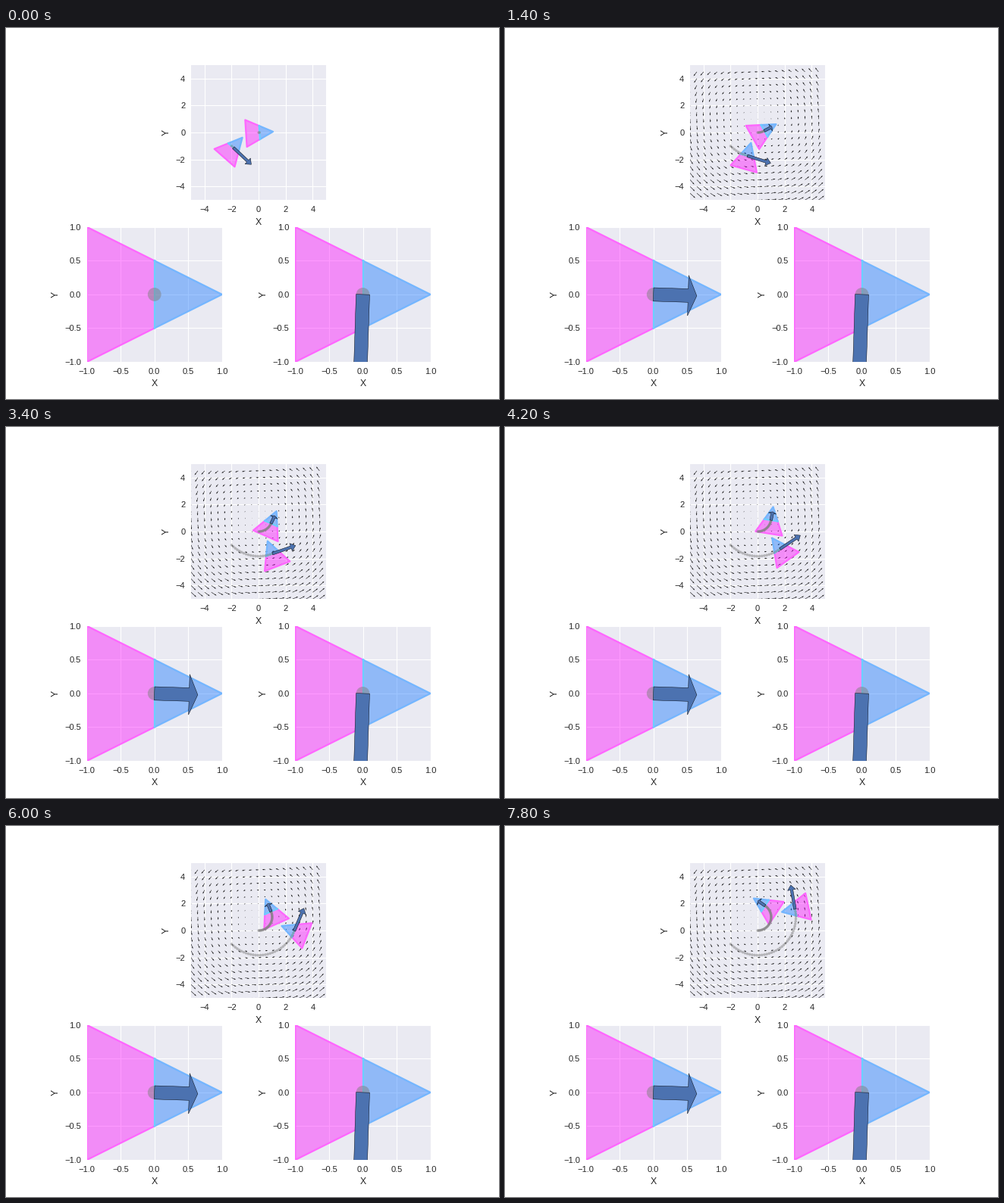
A matplotlib script that plays this animation: 650 px wide and 490 px high, repeating every 8 s.

```python
import numpy as np
import matplotlib.pyplot as plt
from matplotlib.animation import FuncAnimation
from matplotlib.patches import Circle, Polygon

plt.rcParams.update({
    "font.family": "Liberation Sans",
    "axes.facecolor": "#EAEAF2", "axes.linewidth": 0, "axes.axisbelow": True,
    "axes.grid": True, "grid.color": "white", "grid.linewidth": 1,
    "grid.linestyle": "-", "axes.labelsize": 11, "axes.labelpad": 5,
    "axes.labelcolor": "0.15", "text.color": "0.15",
    "xtick.color": "0.15", "ytick.color": "0.15",
    "xtick.labelsize": 10, "ytick.labelsize": 10,
    "xtick.major.size": 0, "ytick.major.size": 0,
    "xtick.major.pad": 7, "ytick.major.pad": 7,
})

FRAMES, INTERVAL = 40, 200
TURN = 2 * np.pi / 98            # rotation per step
RATE = TURN / 0.1                # angular speed
PIVOT = np.array([0.0, 1.0])

REAR = np.array([(0, 0.5), (-1, 1), (-1, -1), (0, -0.5)])
NOSE = np.array([(0, 0.5), (1, 0), (0, -0.5)])
SEAM = np.array([(0, 0.5), (0, -0.5)])


def rot(a):
    return np.array([[np.cos(a), -np.sin(a)], [np.sin(a), np.cos(a)]])


def arrow_points(tail, vec):
    """Outline of a block arrow of fixed width from tail along vec."""
    size = np.hypot(*vec)
    x = np.array([0, 0, 0.8, 0.8, 1, 0.8, 0.8]) * size
    y = np.array([0.1, -0.1, -0.1, -0.3, 0, 0.3, 0.1])
    return np.column_stack([x, y]) @ rot(np.arctan2(vec[1], vec[0])).T + tail


class Body:
    """Two-coloured triangle with an optional velocity arrow."""

    def __init__(self, ax):
        self.fills = [ax.add_patch(Polygon(p, fc=c, alpha=0.4, lw=0, zorder=2))
                      for p, c in ((REAR, "#ff00ff"), (NOSE, "#0a70ff"))]
        self.lines = [ax.plot([], [], color=c, lw=2, zorder=3)[0]
                      for c in ("#ff66ff", "#74b6ff", "#6ccfff")]
        self.arrow = ax.add_patch(Polygon(arrow_points((0, 0), (1, 0)),
                                          fc="#4C72B0", ec="black", lw=0.4,
                                          zorder=5))
        self.place(np.zeros(2), 0)

    def place(self, pos, angle):
        m = rot(angle).T
        for patch, pts in zip(self.fills, (REAR, NOSE)):
            patch.set_xy(pts @ m + pos)
        for line, pts in zip(self.lines, (REAR, NOSE, SEAM)):
            line.set_data(*(pts @ m + pos).T)

    def point(self, pos, vec):
        self.arrow.set_xy(arrow_points(pos, vec))


class Robot:
    """Rigid rider on a circle about PIVOT, with its own body-frame panel."""

    def __init__(self, world, panel, start, heading):
        self.offset = np.array(start) - PIVOT
        self.heading = heading
        self.body = Body(world)
        self.local = Body(panel)
        dot(panel, (0, 0))
        self.trail = [dot(world, self.pose(k)[0]) for k in range(FRAMES + 1)]
        # backward difference, so it lags by half a step
        tangent = RATE * rot(np.pi / 2 - TURN / 2) @ self.offset
        self.vel = rot(-heading) @ tangent
        self.local.point(np.zeros(2), self.vel)

    def pose(self, step):
        a = step * TURN
        return PIVOT + rot(a) @ self.offset, a + self.heading

    def update(self, step):
        pos, angle = self.pose(step)
        self.body.place(pos, angle)
        self.body.point(pos, rot(angle) @ self.vel)
        for k, mark in enumerate(self.trail):
            mark.set_visible(k <= step)

    def show_arrows(self, on):
        self.body.arrow.set_visible(on)
        self.local.arrow.set_visible(on)


def dot(ax, pos):
    return ax.add_patch(Circle(pos, 0.1, fc="0.5", alpha=0.5, lw=0, zorder=4))


def make_axes(cell, span, lim, ticks):
    ax = plt.subplot2grid((2, 2), cell, colspan=span)
    ax.set_aspect("equal")
    ax.set(xlim=(-lim, lim), ylim=(-lim, lim), xticks=ticks, yticks=ticks,
           xlabel="X", ylabel="Y")
    return ax


fig = plt.figure(figsize=(8.125, 6.125), dpi=80, facecolor="white")
fig.subplots_adjust(left=0.125, right=0.9, bottom=0.1, top=0.9,
                    wspace=0.2, hspace=0.2)
world = make_axes((0, 0), 2, 5, np.arange(-4, 5, 2))
left = make_axes((1, 0), 1, 1, np.linspace(-1, 1, 5))
right = make_axes((1, 1), 1, 1, np.linspace(-1, 1, 5))

gx, gy = np.meshgrid(np.arange(-5, 5, 0.5), np.arange(-5, 5, 0.5))
field = world.quiver(gx, gy, -RATE * (gy - PIVOT[1]), RATE * (gx - PIVOT[0]),
                     color="black", zorder=1.5)

lead = Robot(world, left, (0, 0), 0)
rider = Robot(world, right, (-2, -1), np.pi / 4)


def update(i):
    for robot in (lead, rider):
        robot.update(i + 1)
    # the lead has no velocity until its second pose
    lead.show_arrows(i > 0)
    field.set_visible(i > 0)
    return []


anim = FuncAnimation(fig, update, frames=FRAMES, interval=INTERVAL,
                     init_func=lambda: update(0), repeat=True, repeat_delay=0)
plt.show()
```
